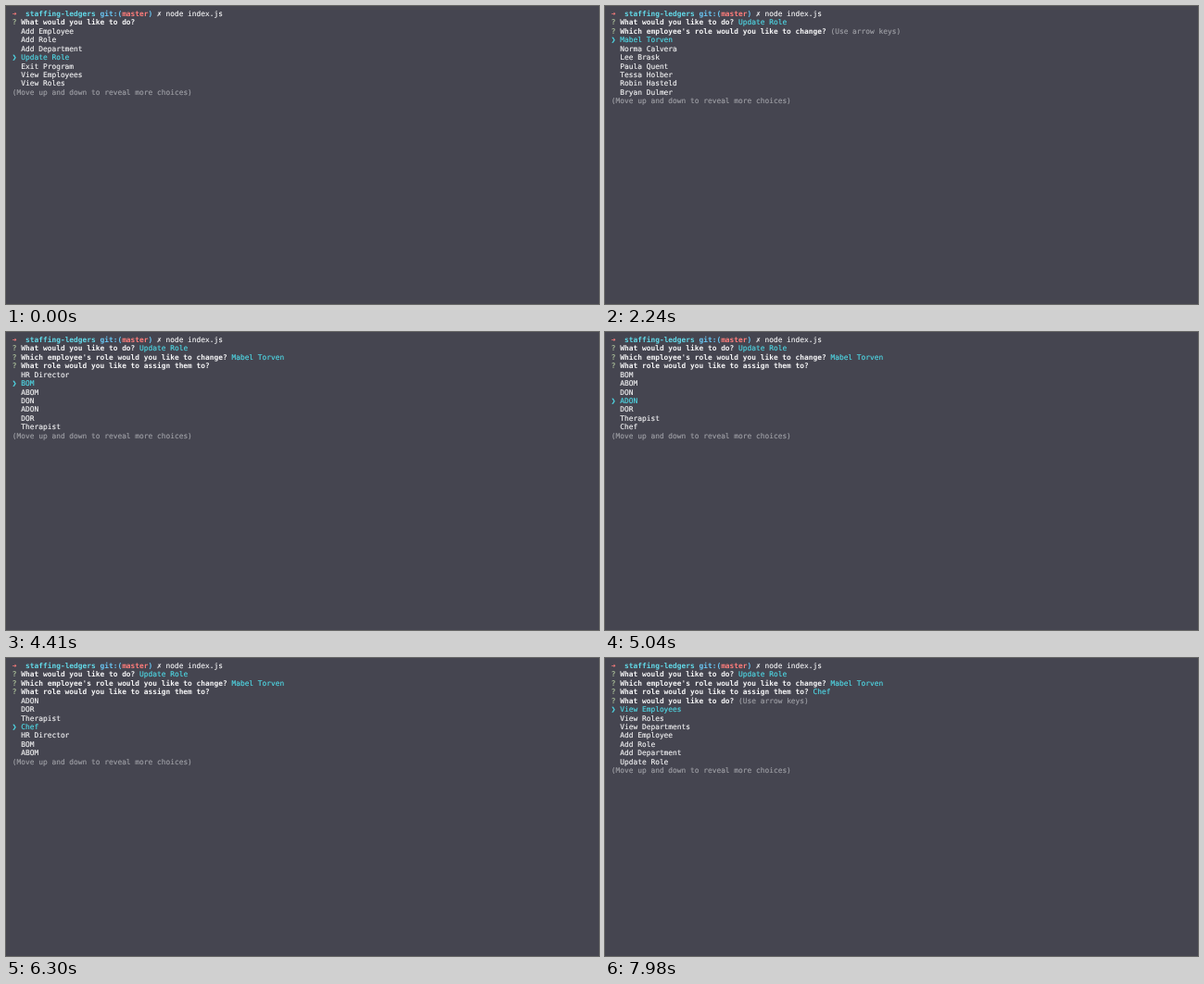
Write an HTML page that moves like this. It is 640 by 322 pixels and loops after 8000 ms.

```html
<!DOCTYPE html>
<html lang="en">
<head>
<meta charset="utf-8">
<title>Terminal menu</title>
<style>
  html, body { margin: 0; width: 100%; height: 100%; overflow: hidden; background: #454550; }
  svg { display: block; width: 100%; height: 100%; }
  text {
    font: 7.86px "DejaVu Sans Mono", monospace;
    text-rendering: geometricPrecision;
    white-space: pre;
    color: #f6f6f7;
    fill: currentColor;
    stroke: currentColor;
    stroke-width: 0.14px;
  }
  .bold, .dir, .git, .red { font-weight: bold; stroke: none; }
  .dir { color: #62d9e8; }
  .git { color: #69c6f4; }
  .red { color: #ff7d7b; }
  .cyan { color: #4fdce9; }
  .mark { color: #b4cba0; }
  .dim { color: #a0a1a7; }
</style>
</head>
<body>
<svg id="screen" viewBox="0 0 640 322"></svg>
<script>
const LOOP = 8000;
const LEFT = 6.85, COL = 4.732, BASE = 10.8, ROW = 9.46;
const PAGE = 7, MIDDLE = 3;

const PICK_ROLE = 910, PICK_PERSON = 3080, FIRST_KEY = 4340, KEY_GAP = 230, PICK_NEW = 6860;

const menu = ['View Employees', 'View Roles', 'View Departments', 'Add Employee',
  'Add Role', 'Add Department', 'Update Role', 'Exit Program'];
const people = ['Mabel Torven', 'Norma Calvera', 'Lee Brask', 'Paula Quent',
  'Tessa Holber', 'Robin Hasteld', 'Bryan Dulmer'];
const roles = ['HR Director', 'BOM', 'ABOM', 'DON', 'ADON', 'DOR', 'Therapist', 'Chef'];

const askMenu = 'What would you like to do?';
const askPerson = "Which employee's role would you like to change?";
const askRole = 'What role would you like to assign them to?';

const shell = [['➜', 'red'], ['  '], ['staffing-ledgers', 'dir'], [' '], ['git:(', 'git'],
  ['master', 'red'], [')', 'git'], [' ✗ node index.js']];

const prompt = (question, tail = '', style = 'cyan') =>
  [['?', 'mark'], [' '], [question, 'bold'], [' '], [tail, style]];

const hinted = question => prompt(question, '(Use arrow keys)', 'dim');

// The pointer walks to the middle of the page, then the list scrolls and wraps.
function list(items, index) {
  const start = Math.max(0, index - MIDDLE);
  const rows = [];
  for (let i = start; i < start + PAGE; i++) {
    const name = items[i % items.length];
    rows.push(i === index ? [['❯', 'cyan'], [' '], [name, 'cyan']] : [['  '], [name]]);
  }
  rows.push([['(Move up and down to reveal more choices)', 'dim']]);
  return rows;
}

function rowsAt(t) {
  if (t < PICK_ROLE) return [shell, prompt(askMenu), ...list(menu, 6)];
  const done = [shell, prompt(askMenu, 'Update Role')];
  if (t < PICK_PERSON) return [...done, hinted(askPerson), ...list(people, 0)];
  done.push(prompt(askPerson, people[0]));
  if (t < PICK_NEW) {
    const presses = Math.floor((t - FIRST_KEY) / KEY_GAP) + 1;
    const index = Math.max(0, Math.min(roles.length - 1, presses));
    return [...done, index ? prompt(askRole) : hinted(askRole), ...list(roles, index)];
  }
  return [...done, prompt(askRole, 'Chef'), hinted(askMenu), ...list(menu, 0)];
}

function drawRow(parts, row) {
  let col = 0;
  const y = (BASE + row * ROW).toFixed(2);
  return parts.map(([str, style = '']) => {
    const lead = str.length - str.trimStart().length;
    const x = (LEFT + (col + lead) * COL).toFixed(2);
    col += str.length;
    return str.trim() ? `<text class="${style}" x="${x}" y="${y}">${str.trim()}</text>` : '';
  }).join('');
}

const screen = document.getElementById('screen');
let shown = '';

function render(t) {
  const markup = rowsAt(t).map(drawRow).join('');
  if (markup !== shown) screen.innerHTML = shown = markup;
}

const began = performance.now();
function tick() {
  render((performance.now() - began) % LOOP);
  requestAnimationFrame(tick);
}
tick();
</script>
</body>
</html>
```
